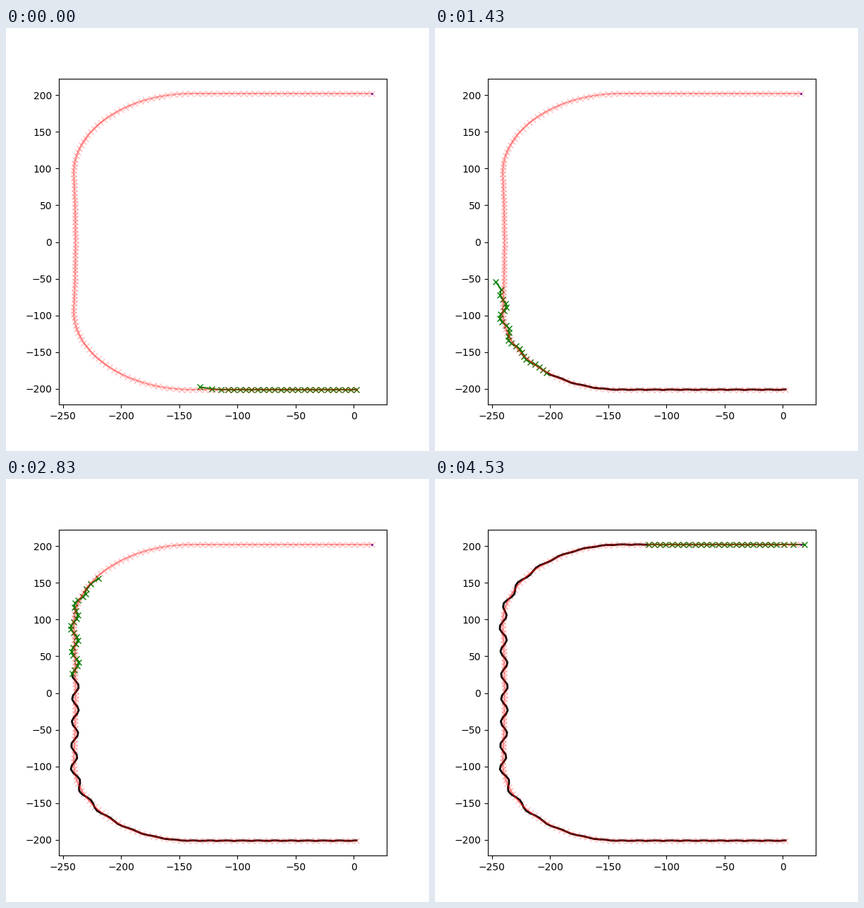
Recreate the animation shown at these times as a matplotlib script. Size 600 px wide and 600 px high, loop 4.56 s.

```python
import numpy as np
import matplotlib.pyplot as plt
from matplotlib.animation import FuncAnimation

LOOP_MS = 4560
FRAMES = 137
STEP = 5.01          # distance driven per frame
HORIZON = 25         # planned steps ahead

LEFT, BOTTOM, TOP = -240.8, -201, 202
BEND_X, BEND_Y = -139, 94
START_X, END_X, FAR_X = 2.2, 15.4, 60


def bend(y_edge):
    """Quarter ellipse from a horizontal edge to the left side."""
    t = np.linspace(0, np.pi / 2, 300)
    centre = np.copysign(BEND_Y, y_edge)
    x = BEND_X + (LEFT - BEND_X) * np.sin(t)
    y = centre + (y_edge - centre) * np.cos(t)
    return x, y


def build_track():
    """Track resampled at unit distances."""
    low_x, low_y = bend(BOTTOM)
    high_x, high_y = bend(TOP)
    side_y = np.linspace(-BEND_Y, BEND_Y, 200)[1:-1]
    side_x = LEFT + 1.5 * (1 - (side_y / BEND_Y) ** 2)
    x = np.concatenate([[START_X], low_x, side_x, high_x[::-1], [FAR_X]])
    y = np.concatenate([[BOTTOM], low_y, side_y, high_y[::-1], [TOP]])
    dist = np.append(0, np.cumsum(np.hypot(np.diff(x), np.diff(y))))
    s = np.arange(0, dist[-1])
    return s, np.interp(s, dist, x), np.interp(s, dist, y)


track_s, track_x, track_y = build_track()
dir_x, dir_y = np.gradient(track_x), np.gradient(track_y)
climb = np.clip(dir_y, 0, 1)

# The weave is short and slight on the level, long and wide going up.
phase = np.cumsum(2 * np.pi / (14 + 18 * climb))
phase -= np.interp(408, track_s, phase)
weave = (0.4 + 2.5 * climb ** 4) * np.cos(phase)


def along(s, values):
    return np.interp(s, track_s, values)


def shifted(s, offset):
    """Points at distance s, moved to the right of travel."""
    x = along(s, track_x) + offset * along(s, dir_y)
    y = along(s, track_y) - offset * along(s, dir_x)
    return x, y


# The last planned gaps stretch out.
gaps = STEP * 1.26 ** np.maximum(0, np.arange(HORIZON) - HORIZON + 4)
ahead = np.append(0, np.cumsum(gaps))


def plan(i):
    s = i * STEP + ahead
    offset = along(s, weave)
    drift = np.interp(i, [0, 30, 72, 80, 92], [3.5, -7, -7, 4, 0])
    offset[-2:] = drift * 0.33, drift
    return shifted(s, offset)


fig, ax = plt.subplots(figsize=(6, 6), dpi=100)
margin = 0.05 * (TOP - BOTTOM)
ax.set_xlim(-253.56, 28.2)
ax.set_ylim(BOTTOM - margin, TOP + margin)

driven, = ax.plot([], [], "k-", lw=2)
planned, = ax.plot([], [], "gx-", lw=1.5)
ax.plot([END_X], [TOP], "b.", ms=2)

length = track_s[-1] - (track_x[-1] - END_X)
ref_s = np.linspace(0, length, round(length / 5) + 1)
ref = shifted(ref_s, 0)
ax.plot(*ref, "r-", lw=1.5, alpha=0.35)
ax.plot(*ref, "rx", alpha=0.25)


def draw(i):
    s = np.arange(i + 1) * STEP
    driven.set_data(*shifted(s, along(s, weave)))
    planned.set_data(*plan(i))
    return driven, planned


anim = FuncAnimation(fig, draw, frames=FRAMES, interval=LOOP_MS / FRAMES,
                     repeat=True, repeat_delay=0)
plt.show()
```
